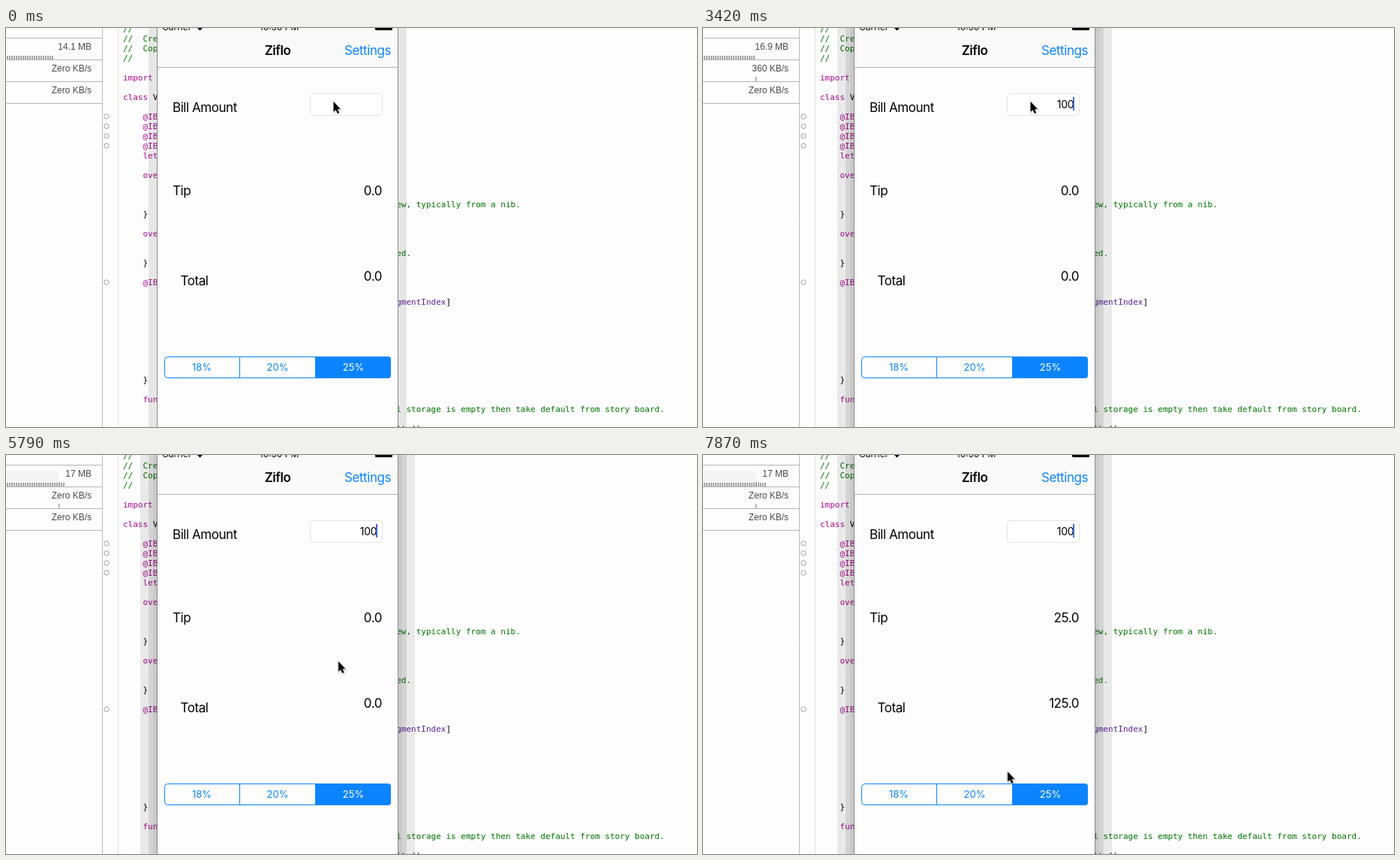
Write an HTML page that moves like this. It is 921 by 532 pixels and loops after 8000 ms.

```html
<!DOCTYPE html>
<html lang="en">
<head>
<meta charset="utf-8">
<title>Tip calculator</title>
<style>
html, body { margin: 0; width: 100%; height: 100%; overflow: hidden; background: #fdfdfd; }
svg { display: block; width: 921px; height: 532px; }
text { white-space: pre; }
.code { font: 11px "DejaVu Sans Mono", monospace; }
.key { fill: #aa0d91; }
.note { fill: #007400; }
.type { fill: #5c2699; }
.stat { font: 12px "Liberation Sans", sans-serif; fill: #4a4a4a; text-anchor: end; }
.ui { font: 17px Inter, sans-serif; letter-spacing: -.45px; }
.title { font-weight: 600; text-anchor: middle; }
.end { text-anchor: end; }
.seg { font: 13px Inter, sans-serif; fill: #0d84ff; text-anchor: middle; }
.bar { font: 12px Inter, sans-serif; }
.bill { font: 14px Inter, sans-serif; letter-spacing: -.2px; text-anchor: end; }

.anim { animation: 8s step-end infinite; }
.halo { animation-name: halo; }
.caret { animation-name: caret; }
.arrow { animation-name: arrow; }
.bars { animation-name: bars; }
.mem1 { animation-name: mem1; }
.mem2 { animation-name: mem2; }
.mem3 { animation-name: mem3; }
.net1 { animation-name: net1; }
.net2 { animation-name: net2; }
.net3 { animation-name: net3; }
.spike { animation-name: spike; }
.one { animation-name: one; }
.ten { animation-name: ten; }
.hundred { animation-name: hundred; }
.zero { animation-name: zero; }
.sum { animation-name: sum; }

@keyframes halo { 0% { opacity: 0 } 1.75%, 100% { opacity: 1 } }
@keyframes mem1 { 0% { opacity: 1 } 11.125%, 100% { opacity: 0 } }
@keyframes mem2 { 0% { opacity: 0 } 11.125% { opacity: 1 } 46.5%, 100% { opacity: 0 } }
@keyframes mem3 { 0% { opacity: 0 } 46.5%, 100% { opacity: 1 } }
@keyframes net1 { 0% { opacity: 1 } 11.125% { opacity: 0 } 46.5%, 100% { opacity: 1 } }
@keyframes net2 { 0% { opacity: 0 } 11.125% { opacity: 1 } 33.375%, 100% { opacity: 0 } }
@keyframes net3 { 0% { opacity: 0 } 33.375% { opacity: 1 } 46.5%, 100% { opacity: 0 } }
@keyframes spike { 0% { opacity: 0 } 11.125%, 100% { opacity: 1 } }
@keyframes one { 0% { opacity: 0 } 35.25% { opacity: 1 } 39%, 100% { opacity: 0 } }
@keyframes ten { 0% { opacity: 0 } 39% { opacity: 1 } 42.75%, 100% { opacity: 0 } }
@keyframes hundred { 0% { opacity: 0 } 42.75%, 100% { opacity: 1 } }
@keyframes zero { 0% { opacity: 1 } 81.625%, 100% { opacity: 0 } }
@keyframes sum { 0% { opacity: 0 } 81.625%, 100% { opacity: 1 } }
@keyframes bars {
  0% { width: 63px }
  18.625% { width: 66px }
  33.375% { width: 69px }
  46.5% { width: 72px }
  57.75% { width: 75px }
  72.375% { width: 78px }
  85.375% { width: 81px }
  96.5%, 100% { width: 84px }
}
@keyframes caret {
  0% { opacity: 0 }
  11.125% { opacity: 1 }
  18.625% { opacity: .5 }
  20.375% { opacity: 0 }
  24.125% { opacity: .6 }
  26% { opacity: 1 }
  29.625% { opacity: .5 }
  31.5% { opacity: 0 }
  35.25% { opacity: 1 }
  50.25% { opacity: .5 }
  52.125% { opacity: 0 }
  55.875% { opacity: .5 }
  57.75% { opacity: 1 }
  63.125% { opacity: .5 }
  65% { opacity: 0 }
  68.75% { opacity: .5 }
  70.625% { opacity: 1 }
  74.25% { opacity: .5 }
  76.125% { opacity: 0 }
  79.75% { opacity: .4 }
  81.625% { opacity: 1 }
  85.375% { opacity: .5 }
  87.125% { opacity: 0 }
  90.875% { opacity: .5 }
  92.75%, 100% { opacity: 1 }
}
@keyframes arrow {
  0% { transform: translate(436px, 98px) }
  57.75% { transform: translate(434px, 160px) }
  59.625% { transform: translate(433px, 245px) }
  61.375% { transform: translate(442.5px, 275px) }
  76.125% { transform: translate(424px, 250px) }
  77.875% { transform: translate(388px, 197px) }
  79.75% { transform: translate(363.5px, 169px) }
  89% { transform: translate(366px, 181px) }
  90.875% { transform: translate(372px, 215px) }
  92.75% { transform: translate(382px, 265px) }
  94.625% { transform: translate(392px, 322px) }
  96.5% { transform: translate(400px, 378px) }
  98.375%, 100% { transform: translate(405.5px, 422px) }
}
</style>
</head>
<body>
<svg viewBox="0 0 921 532">
  <defs>
    <pattern id="ticks" width="3" height="10" patternUnits="userSpaceOnUse">
      <rect x="1" width="2" height="10" fill="#a3a3a3"/>
    </pattern>
  </defs>
  <rect width="921" height="532" fill="#fdfdfd"/>

  <!-- gauges -->
  <rect class="anim mem3" x="1" y="21" width="69" height="17" fill="#f4f4f4"/>
  <path d="M0 13.5H128M0 42.5H128M0 71.5H128M0 100.5H128" stroke="#b5b5b5"/>
  <path d="M128.5 0V532" stroke="#b9b9b9"/>
  <path d="M149.5 0V532" stroke="#e2e2e2"/>
  <rect class="anim bars" y="37" width="63" height="5" fill="url(#ticks)"/>
  <rect class="anim mem3" x="70" y="36" width="2" height="2" fill="#a3a3a3"/>
  <rect class="anim spike" x="70" y="65" width="1.5" height="6" fill="#a3a3a3"/>
  <g class="stat">
    <text class="anim mem1" x="114" y="29">14.1 MB</text>
    <text class="anim mem2" x="114" y="29">16.9 MB</text>
    <text class="anim mem3" x="114" y="29">17 MB</text>
    <text class="anim net1" x="114" y="58">Zero KB/s</text>
    <text class="anim net2" x="114" y="58">376 KB/s</text>
    <text class="anim net3" x="114" y="58">360 KB/s</text>
    <text x="114" y="87">Zero KB/s</text>
  </g>

  <g id="code" class="code"></g>
  <g id="dots" fill="#fdfdfd" stroke="#a0a0a0"></g>

  <!-- window shadow -->
  <rect x="190" width="344" height="532" fill="#000" opacity=".09"/>
  <g class="anim halo">
    <rect x="179" width="366" height="532" fill="#000" opacity=".08"/>
    <rect x="196" width="332" height="532" fill="#000" opacity=".05"/>
  </g>

  <!-- phone -->
  <rect x="201" width="322" height="532" fill="#8c8c8c"/>
  <rect x="202" width="320" height="532" fill="#fdfdfd"/>
  <rect x="202" width="320" height="52" fill="#fafafa"/>
  <path d="M202 52.5H522" stroke="#b2b2b2"/>
  <text class="bar" x="208" y="3">Carrier</text>
  <path d="M253 -2H264L258.5 3.5Z"/>
  <text class="bar" x="364" y="3" font-weight="600" text-anchor="middle">10:50 PM</text>
  <rect x="492" y="-5" width="23" height="8" rx="1.5"/>

  <g class="ui">
    <text class="title" x="362" y="36">Ziflo</text>
    <text class="end" x="513" y="36" fill="#0d84ff">Settings</text>
    <text x="222" y="112">Bill Amount</text>
    <text x="222" y="222.5">Tip</text>
    <text x="232.5" y="343">Total</text>
    <g class="end">
      <text class="anim zero" x="501" y="223">0.0</text>
      <text class="anim zero" x="501" y="337">0.0</text>
      <text class="anim sum" x="501" y="223">25.0</text>
      <text class="anim sum" x="501" y="337">125.0</text>
    </g>
  </g>

  <rect x="405.5" y="87.5" width="96" height="29" rx="4.5" fill="#fff" stroke="#e3e3e3"/>
  <g class="bill">
    <text class="anim one" x="494.5" y="106.5">1</text>
    <text class="anim ten" x="494.5" y="106.5">10</text>
    <text class="anim hundred" x="494.5" y="106.5">100</text>
  </g>
  <rect class="anim caret" x="493" y="92" width="2" height="18" fill="#4069e0"/>

  <rect x="211.5" y="438.5" width="301" height="28" rx="4" fill="#fdfdfd" stroke="#0d84ff"/>
  <path d="M412 438H509a4 4 0 0 1 4 4V463a4 4 0 0 1 -4 4H412Z" fill="#0d84ff"/>
  <path d="M311.5 438V467" stroke="#0d84ff"/>
  <g class="seg">
    <text x="261" y="457">18%</text>
    <text x="362" y="457">20%</text>
    <text x="463" y="457" style="fill:#fff">25%</text>
  </g>

  <g class="anim arrow">
    <path d="M.5 0V14L3.6 11.2L5.8 16L8.2 15L6 10.2H10Z" transform="translate(.5 1)" fill="none" stroke="#000" stroke-width="2.5" opacity=".12"/>
    <path d="M.5 0V14L3.6 11.2L5.8 16L8.2 15L6 10.2H10Z" stroke="#fff" stroke-width="1.2" paint-order="stroke"/>
  </g>
</svg>
<script>
const NS = "http://www.w3.org/2000/svg";
const LEFT = 156, CHAR = 6.622;

function add(parent, tag, attrs, text = "") {
  const el = document.createElementNS(NS, tag);
  for (const k in attrs) el.setAttribute(k, attrs[k]);
  el.textContent = text;
  document.getElementById(parent).append(el);
}

// baseline, column, class, text
const lines = [
  [5, 0, "note", "//"], [18, 0, "note", "//  Cre"], [31, 0, "note", "//  Cop"], [44, 0, "note", "//"],
  [70, 0, "key", "import"], [96, 0, "key", "class"], [96, 6, "", "V"],
  [122, 4, "key", "@IB"], [135, 4, "key", "@IB"], [148, 4, "key", "@IB"], [161, 4, "key", "@IB"],
  [174, 4, "key", "let"], [200, 4, "key", "ove"],
  [239, 55, "note", "ew, typically from a nib."],
  [252, 4, "", "}"], [278, 4, "key", "ove"],
  [304, 55, "note", "ed."],
  [317, 4, "", "}"], [343, 4, "key", "@IB"],
  [369, 55, "type", "gmentIndex"], [369, 65, "", "]"],
  [473, 4, "", "}"], [499, 4, "key", "fun"],
  [512, 55, "note", "l storage is empty then take default from story board."],
  [538, 55, "", "lt ()"]
];
for (const [y, col, cls, str] of lines)
  add("code", "text", { x: LEFT + col * CHAR, y, class: cls }, str);

for (const cy of [118, 131, 144, 157, 339])
  add("dots", "circle", { cx: 134, cy, r: 3.2 });
</script>
</body>
</html>
```
